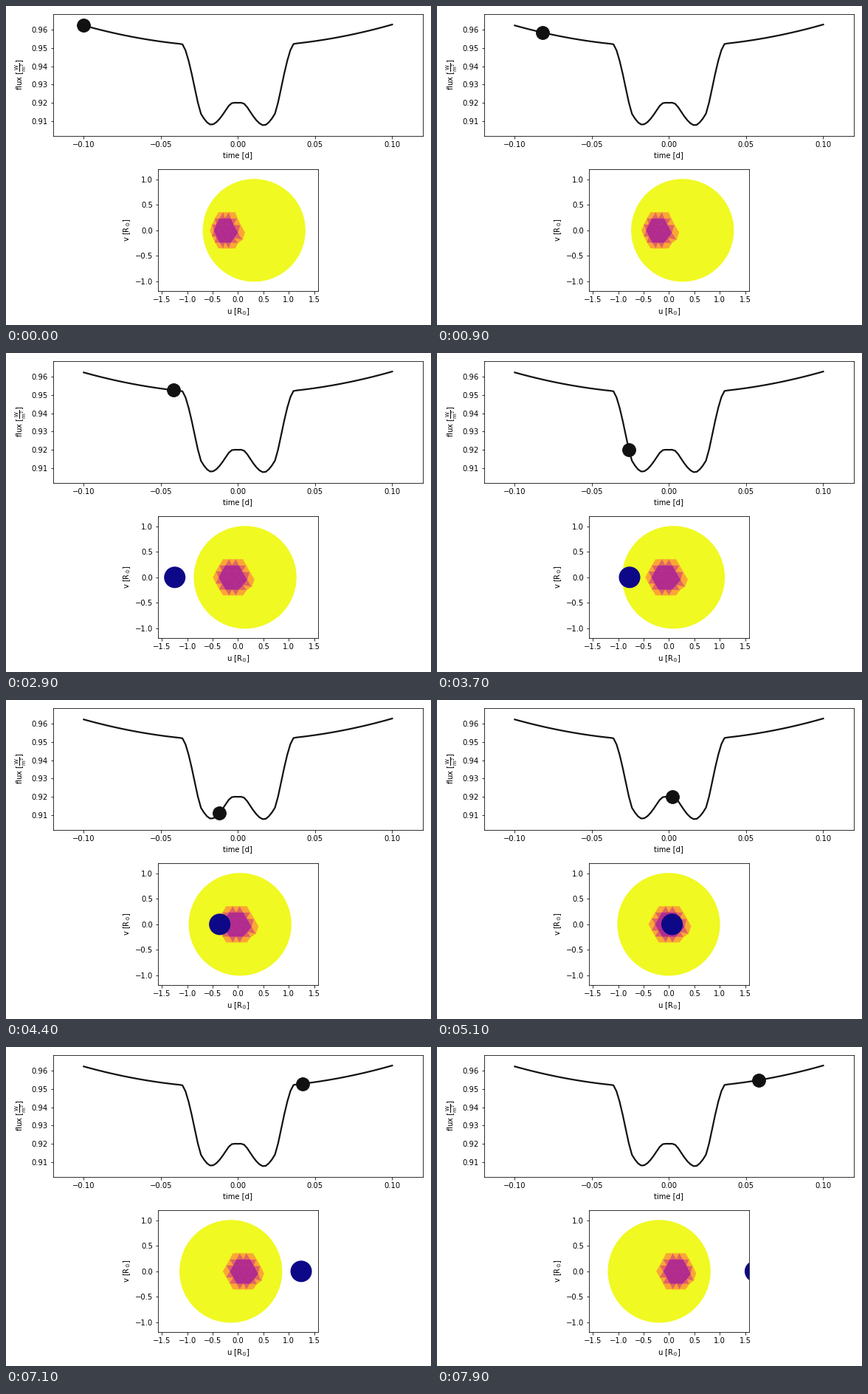
A matplotlib script for the animation above (8000 ms loop, 576 by 432 pixels).

```python
import numpy as np
import matplotlib.pyplot as plt
from matplotlib.animation import FuncAnimation
from matplotlib.collections import PolyCollection
from matplotlib.patches import Circle

W, H, DPI = 576, 432, 72
FRAMES = 80
INK = "#111111"
STAR_ORBIT, PLANET_ORBIT = 0.54, 4.77
STAR_R, PLANET_R = 1.0, 0.2
SPOT_R, SPOT_BLUR, SPOT_DIM = 0.305, 0.1, 0.378
LIMB, DEPTH = 0.57, 0.0496
EDGE = 0.139  # spot mesh edge, radians
RINGS = 3

plasma = plt.get_cmap("plasma")


def light_curve(t):
    """Slow spot modulation minus the starlight hidden by the planet."""
    theta = 2 * np.pi * t[:, None]
    base = 0.9507 + 0.0025 * t + 1.19 * t**2

    # Even sunflower sampling of the planet's disc.
    k = np.arange(3000) + 0.5
    r, a = PLANET_R * np.sqrt(k / k.size), k * np.pi * (3 - np.sqrt(5))
    x = (STAR_ORBIT + PLANET_ORBIT) * np.sin(theta) + r * np.cos(a)
    y = r * np.sin(a)

    rho2 = x**2 + y**2
    mu = np.sqrt(np.clip(1 - rho2, 0, 1))
    light = np.where(rho2 < 1, 1 - LIMB * (1 - mu), 0)
    from_spot = np.hypot(x - np.sin(theta) + 0.008, y)
    dark = np.clip((SPOT_R - from_spot) / SPOT_BLUR + 0.5, 0, 1)
    return base - DEPTH * np.mean(light * (1 - SPOT_DIM * dark), axis=1)


def ring(i, j):
    return max(abs(i), abs(j), abs(i + j))


def on_sphere(i, j):
    x, y = i + j / 2, j * np.sqrt(3) / 2
    # The lattice is pulled aside where the mesh closes on itself.
    pull = np.exp(-(x - 2.4)**2 - (y + 0.5)**2)
    x, y = x + 0.35 * pull, y - 0.55 * pull
    r = EDGE * np.hypot(x, y)
    k = EDGE * np.sinc(r / np.pi)
    return k * x, k * y, np.cos(r)


def spot_mesh():
    tris, colors = [], []
    span = range(-RINGS, RINGS + 1)
    for i in span:
        for j in span:
            for tri in ([(i, j), (i + 1, j), (i, j + 1)],
                        [(i + 1, j), (i + 1, j + 1), (i, j + 1)]):
                if max(ring(*p) for p in tri) > RINGS:
                    continue
                inside = sum(ring(*p) < RINGS for p in tri)
                tris.append([on_sphere(*p) for p in tri])
                colors.append(plasma(1 - 0.2 * inside))
    return np.array(tris), colors


def add_axes(left, top, right, bottom, **options):
    box = [left / W, 1 - bottom / H, (right - left) / W, (bottom - top) / H]
    return fig.add_axes(box, **options)


fig = plt.figure(figsize=(W / DPI, H / DPI), dpi=DPI, facecolor="white")

top = add_axes(63.6, 10.8, 565.2, 175.95, xlabel="time [d]",
               ylabel=r"flux [$\mathrm{\frac{W}{m^{2}}}$]",
               xlim=(-0.12, 0.12), ylim=(0.9019, 0.96863))
sky = add_axes(205.9, 221.2, 422.9, 386.4,
               xlabel=r"u [$\mathrm{R_{\odot}}$]", ylabel=r"v [$\mathrm{R_{\odot}}$]",
               xlim=(-1.576, 1.576), ylim=(-1.2, 1.2))

times = np.linspace(-0.1, 0.1, 101)
flux = light_curve(times)
top.plot(times, flux, color=INK, lw=2.2)
dot, = top.plot([], [], "o", color=INK, ms=17.8, mew=1, zorder=3)

tris, tri_colors = spot_mesh()
star = Circle((0, 0), STAR_R, color=plasma(1.0), lw=1.5, zorder=1)
spot = PolyCollection(tris[:, :, :2], facecolors=tri_colors,
                      edgecolors=tri_colors, lw=0.5, zorder=1.5)
planet = Circle((0, 0), PLANET_R, color=plasma(0.0), lw=1.5, zorder=2)
sky.add_patch(star)
sky.add_collection(spot)
sky.add_patch(planet)


def update(n):
    theta = 2 * np.pi * times[n]
    s, c = np.sin(theta), np.cos(theta)
    dot.set_data([times[n]], [flux[n]])
    star_u = -STAR_ORBIT * s
    star.center = (star_u, 0)
    planet.center = (PLANET_ORBIT * s, 0)
    u = star_u + tris[..., 0] * c + tris[..., 2] * s
    spot.set_verts(np.stack([u, tris[..., 1]], axis=-1))
    return dot, star, spot, planet


anim = FuncAnimation(fig, update, frames=FRAMES, interval=100,
                     repeat=True, repeat_delay=0)
plt.show()
```
